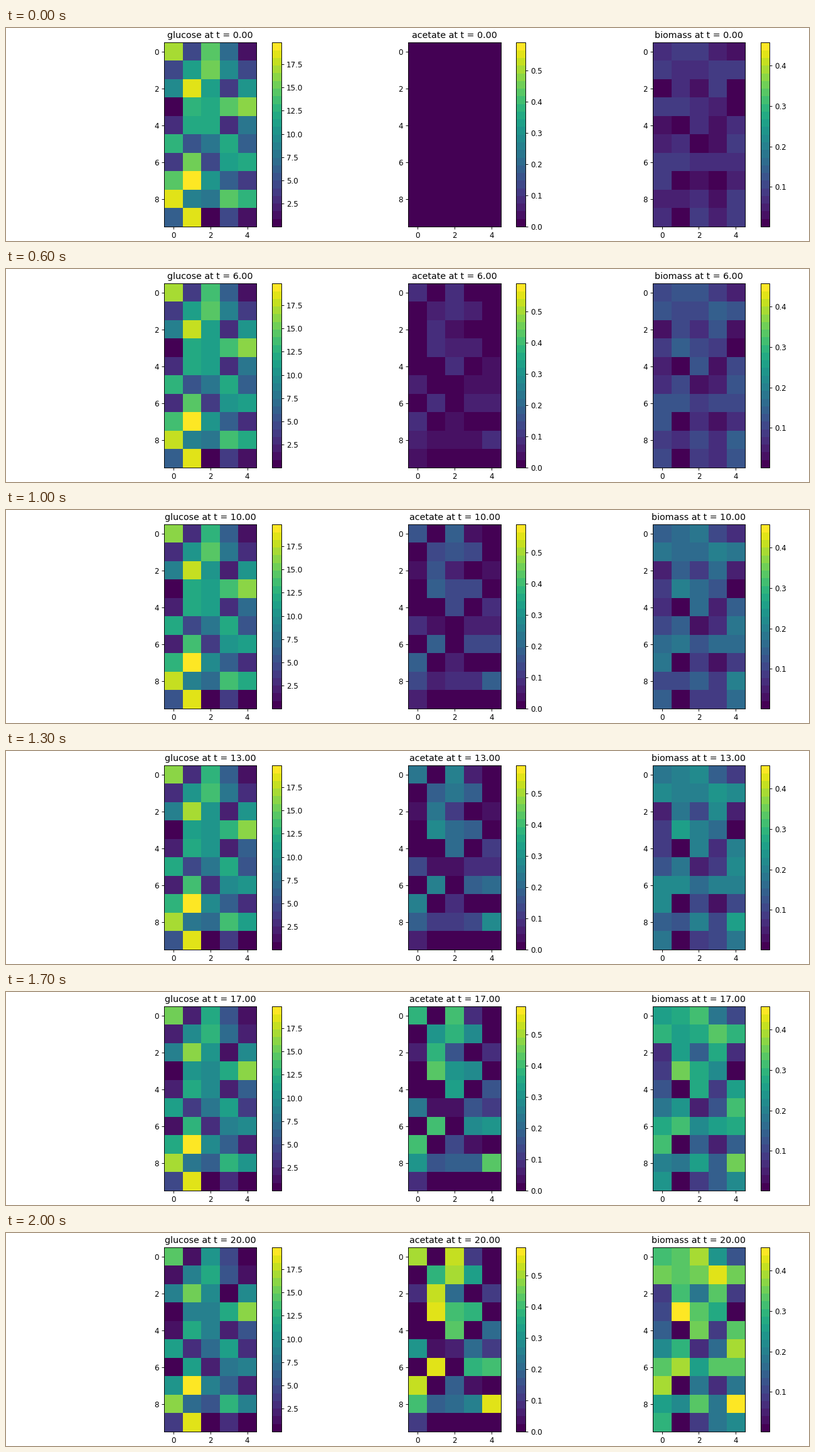
Animation of 1280 by 341 pixels, one loop 2100 ms. Source, as a matplotlib script:

```python
import numpy as np
import matplotlib.pyplot as plt
from matplotlib.animation import FuncAnimation

W, H, DPI = 1280, 341, 80
STEPS, INTERVAL = 21, 100
K = 16 / 15  # size of text and lines

plt.rcParams.update({
    "font.family": "DejaVu Sans",
    "font.size": 10 * K,
    "axes.titlepad": 6 * K,
    "axes.linewidth": 0.8 * K,
})
for axis in ("xtick", "ytick"):
    plt.rcParams[f"{axis}.major.size"] = 3.5 * K
    plt.rcParams[f"{axis}.major.width"] = 0.8 * K
    plt.rcParams[f"{axis}.major.pad"] = 3.5 * K

# Starting conditions in percent of each field's range; the rest is simulated
SUGAR = [86, 21, 71, 34, 8, 21, 58, 76, 47, 21,
         46, 93, 56, 17, 52, 1, 65, 60, 71, 81,
         14, 60, 60, 14, 40, 65, 28, 40, 62, 33,
         17, 75, 21, 56, 60, 71, 99, 52, 33, 17,
         92, 45, 41, 71, 65, 33, 94, 0, 22, 8]
CELLS = [14, 17, 17, 11, 8, 18, 15, 15, 19, 18,
         4, 14, 8, 18, 4, 17, 20, 15, 12, 0,
         8, 0, 16, 5, 15, 10, 14, 3, 7, 18,
         18, 17, 13, 15, 15, 17, 0, 8, 3, 9,
         11, 10, 15, 8, 20, 14, 0, 19, 9, 18]

GROWTH, HALF_SUGAR, COST, SUB = .083, .02, .25, 20


def simulate():
    """Cells grow on sugar and spill acetate where sugar is plentiful."""
    sugar, cells = (np.reshape(v, (10, 5)) / 100 for v in (SUGAR, CELLS))
    acetate = np.zeros_like(sugar)
    for _ in range(STEPS):
        yield sugar, acetate, cells
        for _ in range(SUB):
            grown = GROWTH * cells * sugar / (HALF_SUGAR + sugar) / SUB
            excess = np.maximum(sugar - .2, 0)
            acetate = acetate + 1.75 * (1 - np.exp(-excess / .3)) * grown
            cells = cells + grown
            sugar = np.maximum(sugar - COST * grown, 0)


states = list(simulate())

# name, value range, colorbar ticks
PANELS = [
    ("glucose", (0.02, 19.82), np.arange(2.5, 18, 2.5)),
    ("acetate", (0.0, 0.590), np.arange(6) / 10),
    ("biomass", (0.002, 0.456), np.arange(1, 5) / 10),
]
LEFT, PITCH, TOP, TALL = 252.0, 389.4, 23.4, 294.6
WIDE, GAP, BAR = TALL / 2, TALL / 12, TALL / 20

fig = plt.figure(figsize=(W / DPI, H / DPI), dpi=DPI, facecolor="white")
cmap = plt.get_cmap("viridis", 24)


def add_axes(left, width):
    return fig.add_axes([left / W, 1 - (TOP + TALL) / H, width / W, TALL / H])


def add_panel(left, span, ticks):
    ax = add_axes(left, WIDE)
    im = ax.imshow(np.zeros((10, 5)), cmap=cmap, vmin=span[0], vmax=span[1],
                   aspect="auto", interpolation="nearest")
    ax.set_xticks(range(0, 5, 2))
    ax.set_yticks(range(0, 10, 2))
    bar = fig.colorbar(im, cax=add_axes(left + WIDE + GAP, BAR), ticks=ticks)
    bar.ax.set_yticks(ticks, [f"{v:.1f}" for v in ticks])
    bar.ax.minorticks_off()
    return im, ax.set_title("")


artists = [add_panel(LEFT + i * PITCH, span, ticks)
           for i, (_, span, ticks) in enumerate(PANELS)]


def update(step):
    for (im, title), (name, (lo, hi), _), share in zip(
            artists, PANELS, states[step]):
        im.set_data(lo + share * (hi - lo))
        title.set_text(f"{name} at t = {step:.2f}")
    return [a for pair in artists for a in pair]


anim = FuncAnimation(fig, update, frames=STEPS, init_func=lambda: update(0),
                     interval=INTERVAL, repeat=True, repeat_delay=0, blit=False)
plt.show()
```
